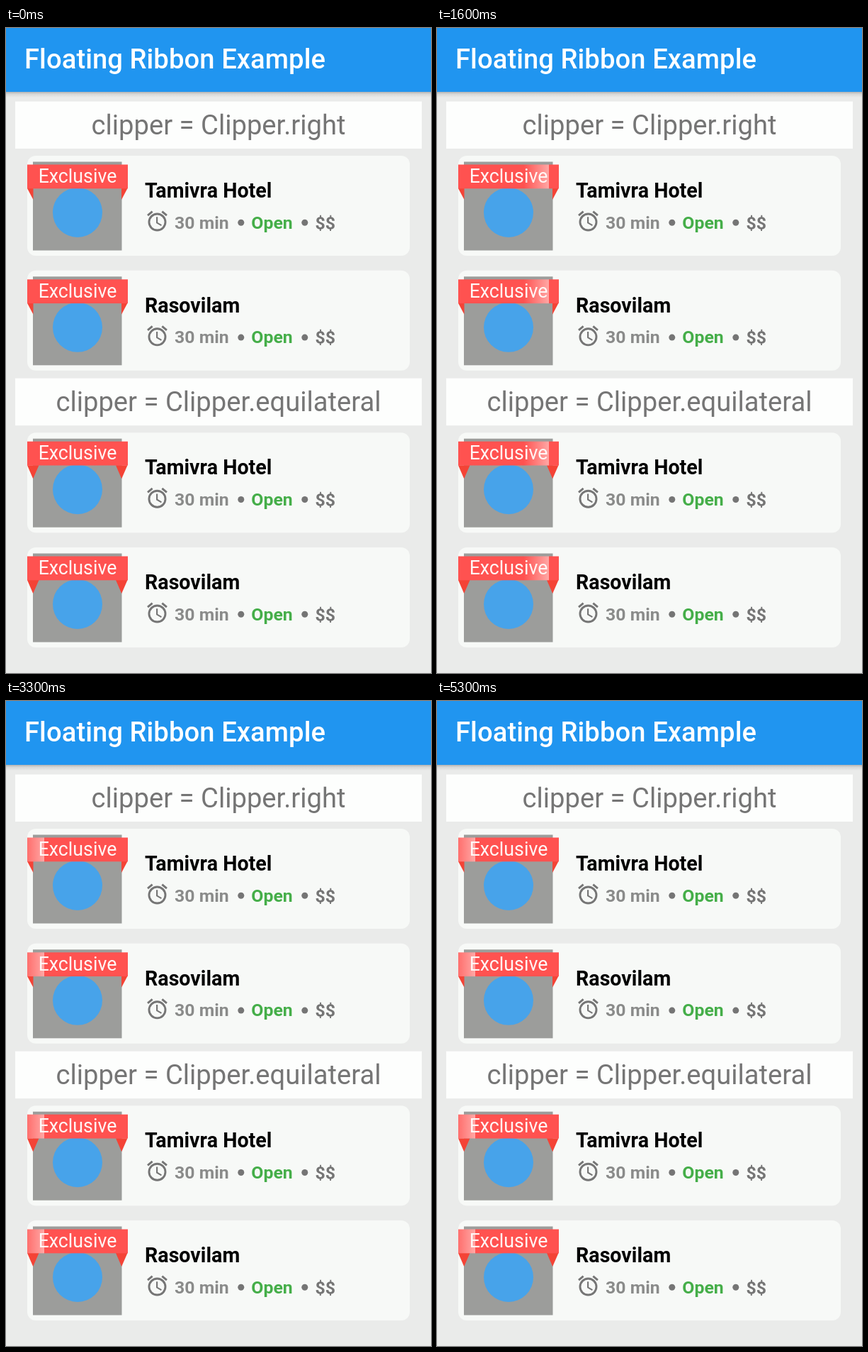
These frames come from a looping animation (600 by 909 pixels, 5.4 s). An HTML page:

```html
<!DOCTYPE html>
<html lang="en">
<head>
<meta charset="utf-8">
<title>Floating Ribbon Example</title>
<style>
  html, body { margin: 0; width: 100%; height: 100%; overflow: hidden; background: #eaebea; }
  svg { display: block; font-family: Roboto, sans-serif; }
  .title { font-size: 38.2px; font-weight: 500; letter-spacing: .06px; fill: #fff; }
  .banner { font-size: 38.2px; text-anchor: middle; fill: #757575; }
  .ribbon { font-size: 26.74px; text-anchor: middle; fill: #fff7f6; }
  .name { font-size: 28.65px; font-weight: 700; }
  .info { font-size: 24.83px; font-weight: 700; fill: #757575; }
</style>
</head>
<body>
<svg id="stage" width="600" height="909" viewBox="0 0 600 909">
  <defs>
    <linearGradient id="shine" gradientUnits="userSpaceOnUse" x1="-36" x2="0" y1="0" y2="0">
      <stop offset="0" stop-color="#ff5250"/>
      <stop offset="1" stop-color="#ffa8a6"/>
      <stop offset="1" stop-color="#ff5250"/>
    </linearGradient>
    <linearGradient id="shadow" x2="0" y2="1">
      <stop offset="0" stop-opacity=".24"/>
      <stop offset=".4" stop-opacity=".08"/>
      <stop offset="1" stop-opacity="0"/>
    </linearGradient>
    <path id="alarm" d="M22 5.72l-4.6-3.86-1.29 1.53 4.6 3.86zM7.88 3.39L6.6 1.86 2 5.71l1.29 1.53zM12.5 8H11v6l4.75 2.85.75-1.23-4-2.37zM12 4a9 9 0 0 0 0 18 9 9 0 0 0 0-18zm0 16a7 7 0 0 1 0-14 7 7 0 0 1 0 14z"/>
  </defs>
  <rect y="90" width="600" height="8" fill="url(#shadow)"/>
  <rect width="600" height="90" fill="#2095f0"/>
  <text class="title" x="26" y="56.5">Floating Ribbon Example</text>
</svg>
<script>
const stage = document.getElementById('stage');
const shine = document.getElementById('shine');

const folds = {
  right: 'M30 226H38.5V242ZM171.5 226H163V242Z',
  equilateral: 'M30 226H46.5L38.2 245ZM155 226H171.5L163.2 245Z'
};

const card = (name, clipper, y) => `
  <g transform="translate(0 ${y})">
    <rect x="30" y="180" width="540" height="141" rx="12" fill="#f7f9f7"/>
    <rect x="38" y="188.5" width="125.5" height="125" fill="#9c9d9b"/>
    <circle cx="101" cy="260" r="35" fill="#47a3ea"/>
    <path d="${folds[clipper]}" fill="#f44336"/>
    <rect x="30" y="192.5" width="142" height="33.8" fill="url(#shine)"/>
    <text class="ribbon" x="101" y="218.3">Exclusive</text>
    <text class="name" x="196" y="239">${name}</text>
    <use href="#alarm" transform="translate(196.2 254.8) scale(1.44)" fill="#757575"/>
    <g class="info">
      <text x="238" y="282.5" fill="#8a8b8a">30 min</text>
      <circle cx="331.8" cy="274.3" r="4.5"/>
      <text x="346.3" y="282.5" fill="#45ae49">Open</text>
      <circle cx="421.8" cy="274.3" r="4.5"/>
      <text x="436.5" y="282.5">$$</text>
    </g>
  </g>`;

const section = (clipper, y) => `
  <rect x="13" y="${y + 103.5}" width="574" height="66.5" fill="#fdfefd"/>
  <text class="banner" x="300" y="${y + 150}">clipper = Clipper.${clipper}</text>
  ${card('Tamivra Hotel', clipper, y)}
  ${card('Rasovilam', clipper, y + 161.8)}`;

stage.insertAdjacentHTML('beforeend', section('right', 0) + section('equilateral', 390.2));

// The bright edge sweeps across once a second, slowing a little past the middle.
const LOOP = 5400, STEP = 100, BAND = 36;
function draw() {
  const time = Math.floor(performance.now() % LOOP / STEP) * STEP;
  const phase = time % 1000 / 1000;
  const edge = 99 + (phase - .4) * (phase < .4 ? 450 : 297);
  shine.setAttribute('x1', edge - BAND);
  shine.setAttribute('x2', edge);
  requestAnimationFrame(draw);
}
draw();
</script>
</body>
</html>
```
